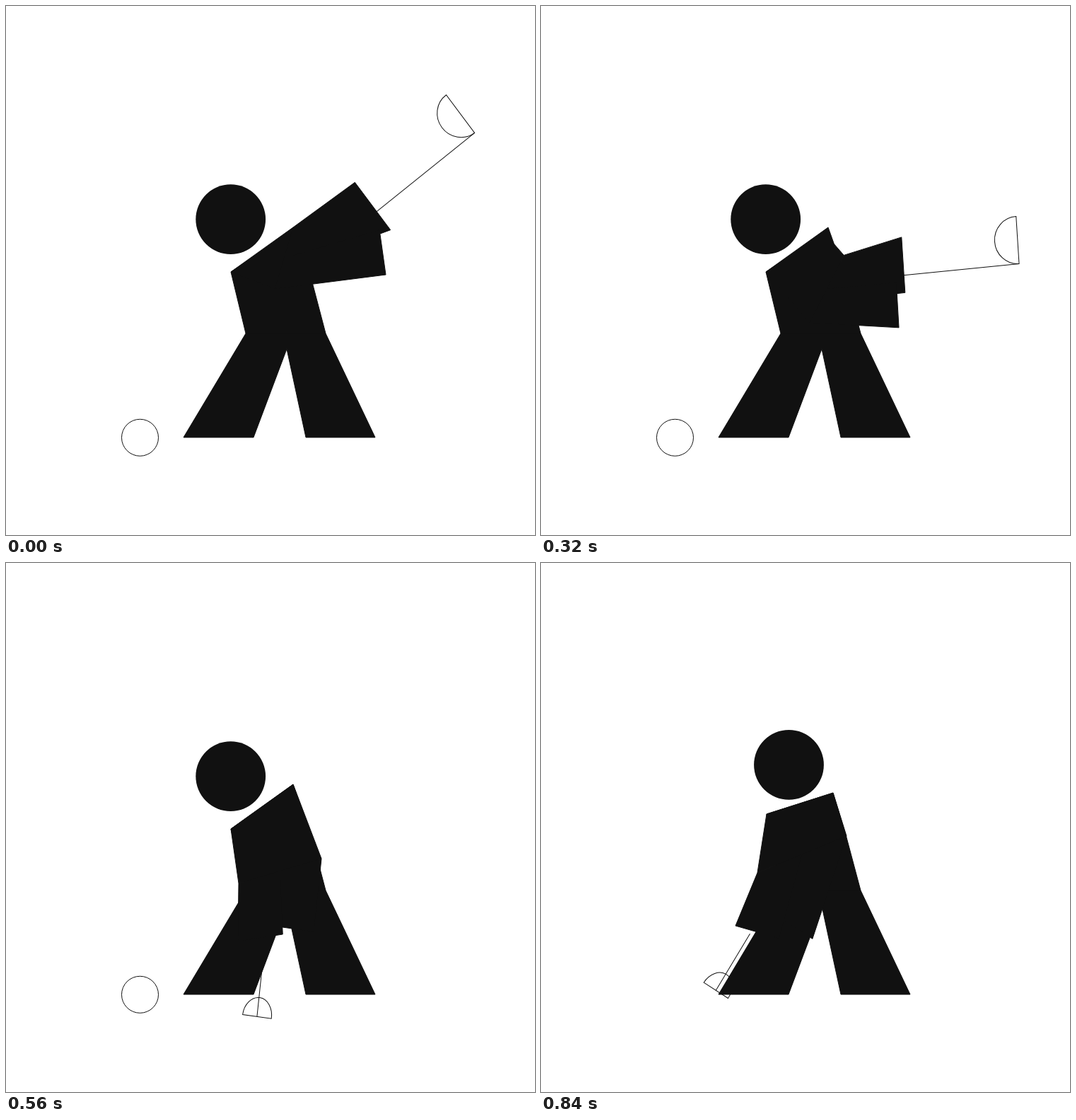
Recreate the animation shown at these times as an HTML page with a canvas. Size 748 by 748 pixels, loop 5000 ms.

```html
<!DOCTYPE html>
<html lang="en">
<head>
<meta charset="utf-8">
<title>Golf swing</title>
<style>
  html, body { margin: 0; width: 100%; height: 100%; overflow: hidden; background: #fff; }
  canvas { display: block; }
</style>
</head>
<body>
<canvas id="stage" width="748" height="748"></canvas>
<script>
const ctx = document.getElementById('stage').getContext('2d');
const INK = '#111';
const LOOP = 5000, STEP = 40;
const PEAK = 5, LEVEL = 10, LOW = 14, HIT = 17, END = 21;
const CUFF = 64;   // width of the rear sleeve
const TILT = 2;    // sleeve and club head lean a little off the shaft

// Key poses: hand is the middle of the front sleeve's end, cuff the outer
// corner of the rear sleeve, bend the direction of that sleeve's end.
const POSES = [
  { at: 0, club: -38.8, shaft: 182, hand: [518.5, 283], elbow: [406, 313],
    rear: [380, 400], cuff: [537, 380], bend: 82 },
  { at: PEAK, club: -43.6, shaft: 176, hand: [505.4, 261], elbow: [398, 320],
    rear: [380, 416], cuff: [537, 349], bend: 68, ease: 0.5 },
  { at: LEVEL, club: 9.1, shaft: 163, hand: [515, 407], elbow: [440, 365],
    rear: [380, 460], cuff: [494, 496], bend: 94, ease: 0.5 },
  { at: LOW, club: 96, shaft: 114.6, hand: [398, 516], elbow: [446, 418],
    rear: [329, 453], cuff: [328, 535], bend: 171 },
  { at: HIT, club: 121, shaft: 106.5, hand: [349.4, 515], elbow: [431, 383],
    rear: [306, 454], cuff: [265, 531], bend: 190 },
  { at: END, club: 121, shaft: 93.5, hand: [352.4, 511], elbow: [432, 386],
    rear: [306, 438], cuff: [275, 513], bend: 196 }
];

const rad = deg => deg * Math.PI / 180;
const mix = (a, b, u) => Array.isArray(a) ? a.map((v, i) => mix(v, b[i], u)) : a + (b - a) * u;
const ramp = (s, from, to) => Math.min(1, Math.max(0, (s - from) / (to - from)));
const along = ([x, y], deg, d) => [x + d * Math.cos(rad(deg)), y + d * Math.sin(rad(deg))];

function poseAt(step) {
  const i = Math.max(1, POSES.findIndex(p => p.at >= step));
  const a = POSES[i - 1], b = POSES[i];
  const t = ramp(step, a.at, b.at);
  const u = t + (a.ease || 0) * t * (1 - t);
  const pose = {};
  for (const key of ['club', 'shaft', 'hand', 'elbow', 'rear', 'cuff', 'bend']) {
    pose[key] = mix(a[key], b[key], u);
  }
  return pose;
}

function poly(...points) {
  ctx.beginPath();
  points.forEach(p => ctx.lineTo(p[0], p[1]));
  ctx.closePath();
  ctx.fill();
  ctx.stroke();
}

function disc(x, y, r) {
  ctx.beginPath();
  ctx.arc(x, y, r, 0, Math.PI * 2);
}

// The head turns from side view to front view as the club comes down
function drawClub(pose, step) {
  const front = ramp(step, LEVEL, LOW);
  const hold = mix(0.16, 1.22, ramp(step, PEAK, HIT) ** 1.7);
  const grip = mix(pose.hand, along(pose.cuff, pose.bend, -CUFF / 2), hold);
  ctx.save();
  ctx.translate(...grip);
  ctx.rotate(rad(pose.club));
  ctx.beginPath();
  ctx.moveTo(0, 0);
  ctx.lineTo(pose.shaft, 0);
  ctx.stroke();
  ctx.translate(pose.shaft, 0);
  ctx.rotate(rad(TILT));
  ctx.beginPath();
  ctx.ellipse(0, mix(-33.5, 0, front), mix(32.5, 27, front), mix(33.5, 20.5, front),
    0, Math.PI / 2, Math.PI * 1.5);
  ctx.closePath();
  ctx.stroke();
  ctx.restore();
}

function drawBody(pose, step) {
  const lift = ramp(step, HIT, END);
  const { hand, elbow, rear, cuff, bend } = pose;
  const left = mix([318, 376], [319, 355], lift);
  const right = mix([406, 313], [413, 325], lift);
  const side = mix([431, 383], [432, 388], lift);
  const shoulder = mix([400, 320], right, ramp(step, LEVEL, LOW));
  const half = mix(42, 37.5, ramp(step, PEAK, LEVEL));
  const edge = pose.club + 90 + TILT;

  const [hx, hy] = mix([317.7, 301.6], [350.5, 285.4], lift);
  disc(hx, hy, 49.4);
  ctx.fill();
  poly([339, 463], [452, 463], [522, 610], [424, 610], [397, 485], [350, 610], [251, 610]);
  poly(left, right, side, [452, 463], [339, 463]);
  poly(left, shoulder, elbow, rear);
  poly(elbow, along(hand, edge, -half), along(hand, edge, half), mix(elbow, rear, 0.7));
  poly(rear, cuff, along(cuff, bend, -CUFF), mix(elbow, rear, 0.5));
}

function draw(step) {
  const pose = poseAt(step);
  ctx.fillStyle = '#fff';
  ctx.fillRect(0, 0, 748, 748);
  ctx.fillStyle = ctx.strokeStyle = INK;
  if (step < END) {
    disc(189.5 - 47.7 * Math.max(0, step - HIT), 610.3, 26);
    ctx.stroke();
  }
  drawClub(pose, step);
  drawBody(pose, step);
}

const start = performance.now();
function tick() {
  const t = (performance.now() - start) % LOOP;
  draw(Math.min(END, Math.floor(t / STEP)));
  requestAnimationFrame(tick);
}
tick();
</script>
</body>
</html>
```
